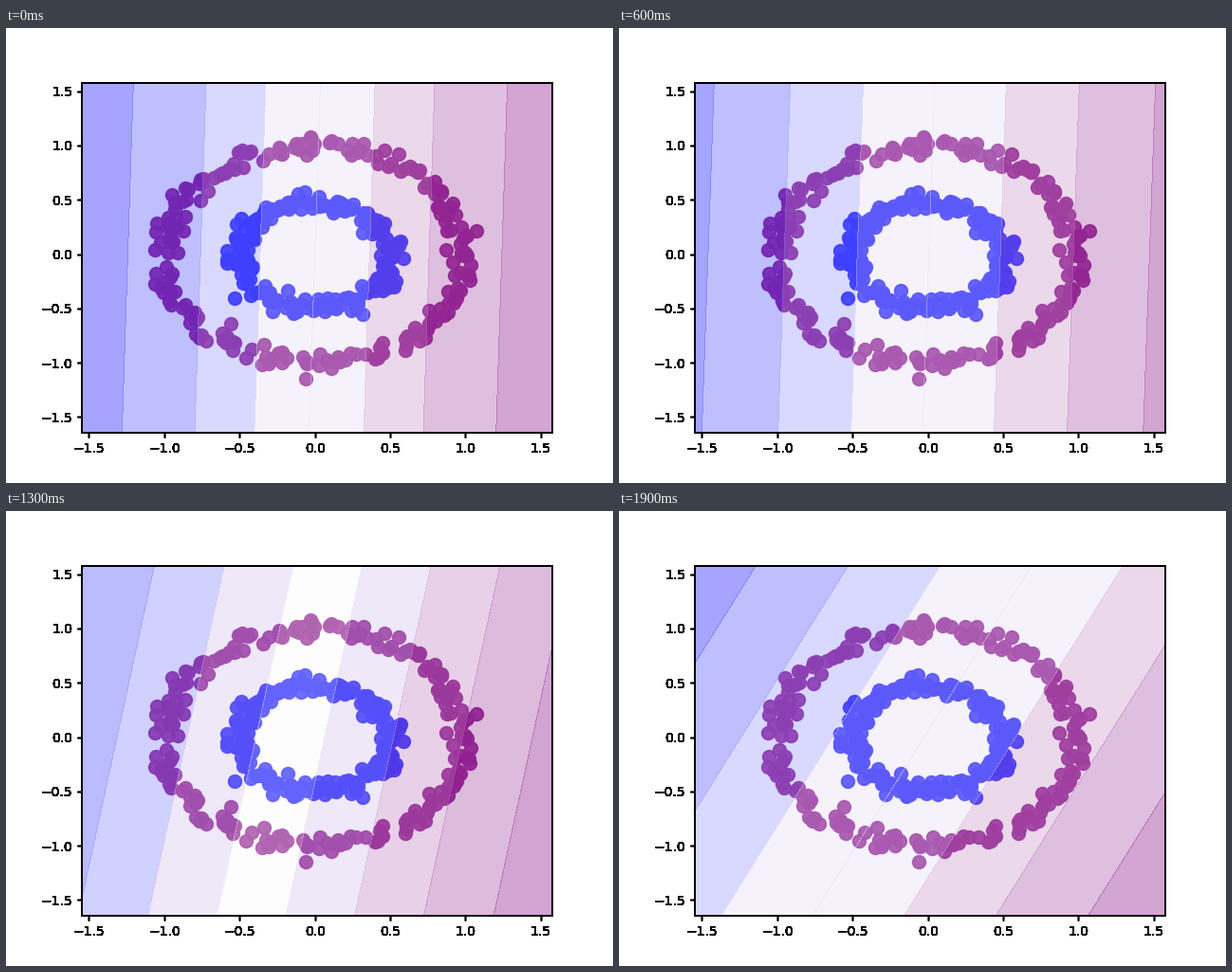
These frames come from a looping animation (640x480 px, 2000 ms). A matplotlib script:

```python
import numpy as np
import matplotlib.pyplot as plt
from matplotlib.animation import FuncAnimation
from matplotlib.colors import LinearSegmentedColormap

FRAMES, INTERVAL = 20, 100
XLIM, YLIM = (-1.547, 1.577), (-1.647, 1.579)
LEFT, RIGHT = 80, 576
DOTS, NOISE = 200, .05

# Boundary at key steps: step, centre (px), lean (px), slope (per px)
KEYS = np.array([(0, 325.5, 12, .00703), (4, 306.5, 13, .00389),
                 (6, 326.5, 13, .00266), (8, 338, 17, .00234),
                 (11, 323.5, 34, .00175), (15, 347, 127, .00101),
                 (19, 319.5, 231, .00083)]).T

BLUE, PURPLE = np.array([0, 0, 1]), np.array([.5, 0, .5])


def shade(p):
    """Blue to near-white to purple; both sides share a lavender centre."""
    t = min(1, abs(2 * p - 1))
    own = BLUE if p < .5 else PURPLE
    tint = (BLUE + PURPLE) / 2 if t < .3 else own
    return 1 - t * (1 - tint) - .02 * (t < .1)


CMAP = LinearSegmentedColormap.from_list(
    "classes", [shade(p) for p in np.linspace(0, 1, 257)], N=1024)

rng = np.random.default_rng(7)


def ring(radius, strays):
    """Even dots on a circle with clipped noise, and a few strays."""
    a = np.linspace(0, 2 * np.pi, DOTS, endpoint=False)
    xy = radius * np.column_stack([np.cos(a), np.sin(a)])
    xy += np.clip(rng.normal(0, NOISE, xy.shape), -.085, .085)
    xy = np.clip(xy, -1.06, 1.06)
    return np.vstack([xy, strays]).T


def setup(ax):
    ax.set_xlim(*XLIM)
    ax.set_ylim(*YLIM)
    ax.set_xticks(np.arange(-1.5, 1.6, .5))
    ax.set_yticks(np.arange(-1.5, 1.6, .5))
    ax.patch.set_visible(False)
    for spine in ax.spines.values():
        spine.set_linewidth(1.44)


fig = plt.figure(figsize=(6.4, 4.8), dpi=100)
box = [.125, .11, .775, .77]
ax = fig.add_axes(box)
setup(ax)
# Stacked axes give the heavy tick labels.
for i in range(15):
    setup(fig.add_axes(box, label=f"frame{i}"))

outer = ring(1, [(-.06, -1.145), (-.87, .21), (-.56, -.64), (1.075, .21),
                 (-1.05, .28), (.87, .04), (-.03, 1.08)])
inner = ring(.5, [(-.53, -.41), (.59, -.04), (.32, .2), (-.49, .33),
                  (.32, -.55)])
for dots, color in ((outer, "purple"), (inner, "blue")):
    ax.scatter(*dots, s=92, c=color, alpha=.93, linewidths=1.5, zorder=1)

gx, gy = np.meshgrid(np.linspace(*XLIM, 160), np.linspace(*YLIM, 160))
px = np.interp(gx, XLIM, (LEFT, RIGHT))
rise = np.interp(gy, YLIM, (-.5, .5))
shown = []


def draw(k):
    while shown:
        shown.pop().remove()
    steps, *tracks = KEYS
    centre, lean, slope = (np.interp(k, steps, t) for t in tracks)
    z = 1 / (1 + np.exp(-slope * (px - centre - lean * rise)))
    shown.append(ax.contourf(gx, gy, z, cmap=CMAP, alpha=.4, zorder=1.5))
    return shown


anim = FuncAnimation(fig, draw, frames=FRAMES, interval=INTERVAL,
                     init_func=lambda: [], repeat=True, repeat_delay=0)
plt.show()
```
